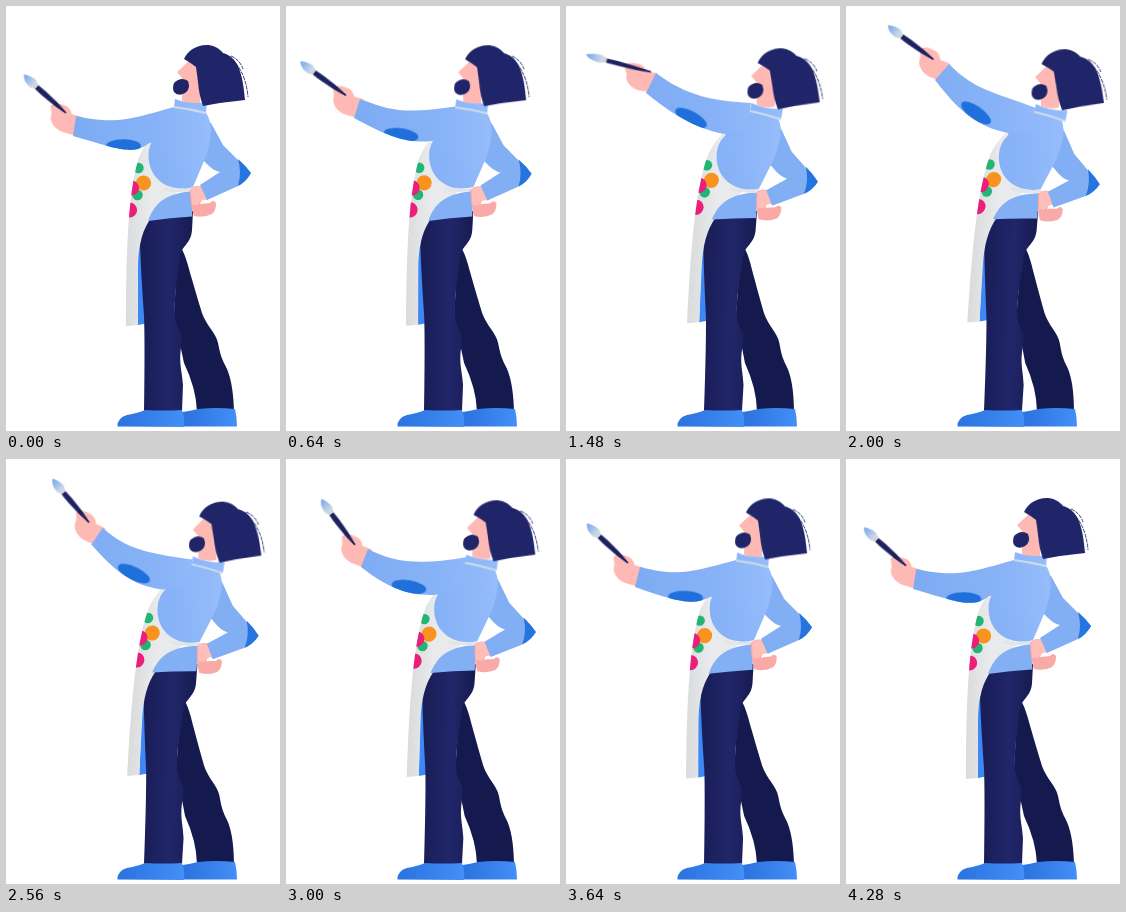
These frames come from a looping animation (274x425 px, 4320 ms). An HTML page without scripts:

```html
<!DOCTYPE html>
<html lang="en">
<head>
<meta charset="utf-8">
<title>Painter</title>
<style>
  @property --lean { syntax: "<number>"; inherits: true; initial-value: 0; }

  html, body { margin: 0; width: 100%; height: 100%; overflow: hidden; background: #fff; }
  svg { display: block; width: 100%; height: 100%; animation: lean 4320ms linear infinite; }

  /* Body parts follow one lean value */
  .torso { transform-origin: 165px 270px; transform: rotate(calc(var(--lean) * 5deg)); }
  .elbow { transform: translate(calc(var(--lean) * .5px), calc(var(--lean) * 4px)); }
  .fist { transform: translate(calc(var(--lean) * 1px), calc(var(--lean) * 2px)); }
  .head {
    transform-origin: 195px 75px;
    transform: translate(calc(var(--lean) * 18.5px), calc(var(--lean) * 4.5px)) rotate(calc(var(--lean) * -2deg));
  }
  .collar {
    transform-origin: 171px 97px;
    transform: translate(calc(var(--lean) * 1.5px), 0px) rotate(calc(var(--lean) * 8deg));
  }
  .legs { transform-origin: 160px 404px; transform: skewX(calc(var(--lean) * -1.5deg)); }
  .apron {
    transform-origin: 126px 319px;
    transform: translate(calc(var(--lean) * 1.5px), calc(var(--lean) * -3.5px)) skewX(calc(var(--lean) * -3.5deg));
  }

  .sleeve { animation: sleeve 4320ms linear infinite; }
  .patch { animation: patch 4320ms linear infinite; }
  .hand { animation: hand 4320ms linear infinite; }
  .brush { animation: brush 4320ms linear infinite; }

  @keyframes lean {
    0%, 100% { --lean: 0; }
    8% { --lean: .01; }
    14.81% { --lean: .06; }
    20% { --lean: .2; }
    25.9% { --lean: .42; }
    34.26% { --lean: .77; }
    39.8% { --lean: .91; }
    46.3% { --lean: .99; }
    52.8% { --lean: 1; }
    60% { --lean: .84; }
    69.44% { --lean: .54; }
    77.8% { --lean: .27; }
    84.26% { --lean: .11; }
    92% { --lean: .03; }
  }
  @keyframes sleeve {
    0%, 100% { d: path("M70 110C112 119 124 113 172 100L165 135L143 137C128 150 112 143 67 130Z"); }
    14.81% { d: path("M74 93C110 107 122 107 173 100L167 133L145 135C125 137 108 134 68 112Z"); }
    34.26% { d: path("M90 67C120 90 148 95 185 97L178 126L158 128C140 124 118 118 80 87Z"); }
    46.3% { d: path("M103 58C128 84 148 86 190 102L182 126L162 127C140 122 120 115 89 74Z"); }
    52.8% { d: path("M106 55C130 83 150 86 190 102L182 126L162 127C141 122 121 113 92 71Z"); }
    69.44% { d: path("M82 90C108 103 130 107 181 98L173 132L148 136C128 136 108 134 75 108Z"); }
    84.26% { d: path("M74 108C112 118 126 113 174 100L167 133L144 138C128 147 112 143 69 128Z"); }
  }
  @keyframes patch {
    0%, 100% { transform: translate(117.5px, 140px) rotate(0deg); }
    14.81% { transform: translate(115px, 129px) rotate(8deg); }
    34.26% { transform: translate(125px, 112px) rotate(28deg); }
    46.3% { transform: translate(130px, 107px) rotate(35deg); }
    52.8% { transform: translate(131px, 106px) rotate(36deg); }
    69.44% { transform: translate(123px, 128px) rotate(10deg); }
    84.26% { transform: translate(119.5px, 138.5px) rotate(2deg); }
  }
  @keyframes hand {
    0%, 100% { transform: translate(68.5px, 120px) rotate(0deg); }
    14.81% { transform: translate(71px, 102.5px) rotate(0deg); }
    34.26% { transform: translate(85px, 77px) rotate(-8deg); }
    46.3% { transform: translate(96px, 66px) rotate(6deg); }
    52.8% { transform: translate(99px, 63px) rotate(12deg); }
    69.44% { transform: translate(78.5px, 99px) rotate(4deg); }
    84.26% { transform: translate(71.5px, 118px) rotate(0deg); }
  }
  @keyframes brush {
    0%, 100% { transform: translate(60px, 107px) rotate(41.5deg) scale(1, 1); }
    14.81% { transform: translate(60px, 89.5px) rotate(36deg) scale(1, 1); }
    23.15% { transform: translate(69px, 78px) rotate(19deg) scale(1.07, .95); }
    34.26% { transform: translate(85px, 66px) rotate(14.5deg) scale(1.18, .85); }
    46.3% { transform: translate(87.5px, 53.5px) rotate(36deg) scale(1, 1); }
    52.8% { transform: translate(92px, 49px) rotate(47deg) scale(1, 1); }
    69.44% { transform: translate(69px, 86px) rotate(53deg) scale(1, 1); }
    84.26% { transform: translate(62px, 104px) rotate(43deg) scale(1, 1); }
  }
</style>
</head>
<body>
<svg viewBox="0 0 274 425" preserveAspectRatio="none">
  <defs>
    <linearGradient id="wool" gradientUnits="userSpaceOnUse" x1="70" y1="130" x2="205" y2="115">
      <stop offset="0" stop-color="#7dabf3"/>
      <stop offset=".6" stop-color="#87b2f7"/>
      <stop offset="1" stop-color="#96bdfb"/>
    </linearGradient>
    <linearGradient id="navy" gradientUnits="userSpaceOnUse" x1="136" y1="0" x2="187" y2="0">
      <stop offset="0" stop-color="#191e58"/>
      <stop offset=".55" stop-color="#21266a"/>
      <stop offset="1" stop-color="#161b50"/>
    </linearGradient>
    <linearGradient id="shoe">
      <stop offset="0" stop-color="#2b73df"/>
      <stop offset="1" stop-color="#438ef7"/>
    </linearGradient>
    <linearGradient id="cloth">
      <stop offset="0" stop-color="#d9dbdd"/>
      <stop offset=".45" stop-color="#e9eaeb"/>
    </linearGradient>
    <linearGradient id="bristle">
      <stop offset="0" stop-color="#6fa6ee"/>
      <stop offset="1" stop-color="#d5dde3"/>
    </linearGradient>
    <path id="bib" d="M120 320C120 295 120 240 124 200Q127 170 133 151Q139 137 151 126L153 140L166 178L171 186L156 202L143 215C135 228 132 242 132 264V319Z"/>
    <clipPath id="bibClip"><use href="#bib"/></clipPath>
    <clipPath id="armClip"><path class="sleeve" d="M70 110C112 119 124 113 172 100L165 135L143 137C128 150 112 143 67 130Z"/></clipPath>
  </defs>

  <path class="apron" fill="#3d88f5" d="M131 240H143V317L132 319Z"/>

  <g class="legs">
    <path fill="#141a4e" d="M172 238C179 245 182 260 185 270Q191 291 196 307C200 319 210 327 212 337C214 347 215 351 219 359Q227 373 228 405H191Q190 382 178 357L168 310Z"/>
    <path fill="url(#navy)" d="M139 207L187 205L186 224C185 238 176 239 174 250C171 275 168 291 169 309C169 322 177 324 176 335C172 358 176 362 177 379L176 405H138Q139 335 138 310Q135 268 134 238Z"/>
  </g>
  <path fill="url(#shoe)" d="M177 406Q184 405 192 403Q210 401 229 403Q231 411 231 420.5H177Z"/>
  <path fill="url(#shoe)" d="M111.5 420.5Q111 412 121 409Q132 407 139 404Q158 405 176 404Q179 411 178 421Z"/>

  <g class="apron">
    <use href="#bib" fill="url(#cloth)"/>
    <g clip-path="url(#bibClip)">
      <circle cx="132.5" cy="162" r="5.2" fill="#22b573"/>
      <circle cx="131.5" cy="189" r="5.2" fill="#22b573"/>
      <circle cx="137.5" cy="177" r="7.6" fill="#f7931e"/>
      <circle cx="125.5" cy="182" r="7.6" fill="#ec1e79"/>
      <circle cx="123.5" cy="204" r="7.6" fill="#ec1e79"/>
    </g>
  </g>

  <g class="torso">
    <path fill="#83aff5" d="M142 215C148 199 157 188 186 185V210.5Q164 212 142 215Z"/>
    <path fill="none" stroke="#e1e5e8" stroke-width="3" d="M158 183Q171 186 188 183"/>
    <g class="fist">
      <path fill="#f9aaa7" d="M184 184Q189 178 196 181L202 194Q196 191 194 198L204 197Q207 193 210 197Q210 205 206 208Q198 212 188 210Q184 199 184 184Z"/>
      <path fill="#ffbeb8" d="M185 184Q189 179 196 181L201 194Q194 193 192 199L186 199Z"/>
    </g>
    <g class="elbow">
      <path fill="#82aef4" d="M198 112L205 117L217 139L232 154Q240 160 245 167Q240 176 232 180L201 194L194 179L214 166Q207 165 198 155L192 150Z"/>
      <path fill="#2475df" d="M232 153Q240 160 245 167Q240 176 232 180Q236 167 232 153Z"/>
    </g>
    <path fill="url(#wool)" d="M150 107L170 101L199 105Q205 114 205 124Q204 142 198 155L187 181C165 187 143 175 142.5 150Q142 139 150 130Z"/>
  </g>

  <g class="hand">
    <path fill="#ffb9b4" d="M7 -9L-3 -12Q-4 -19 -11 -21Q-20 -25 -24 -20L-23 -12Q-25 -7 -22 -2Q-18 4 -12 6L5 11Z"/>
  </g>
  <g class="brush">
    <path fill="#1d2160" d="M0 .8Q-18 3.4 -39 2.5V-2.5Q-18 -3.2 0 -.8Z"/>
    <path fill="#cbd3d9" d="M-39 -2.7L-45 -4.3V4.3L-39 2.7Z"/>
    <path fill="url(#bristle)" d="M-43 -4.6Q-49 -5.5 -57 -1Q-54 4.5 -43 4.6Q-40 0 -43 -4.6Z"/>
  </g>
  <g class="hand">
    <path fill="#ffb9b4" d="M-23 -8Q-17 -12 -12 -9L-8 -3L-14 3Q-21 2 -23 -8Z"/>
  </g>

  <path class="sleeve" fill="url(#wool)" d="M70 110C112 119 124 113 172 100L165 135L143 137C128 150 112 143 67 130Z"/>
  <g clip-path="url(#armClip)">
    <ellipse class="patch" rx="17.5" ry="6.8" fill="#1f70da"/>
  </g>

  <g class="head">
    <path fill="#ffb9b4" d="M184 54L171 66L176 72L176 95Q184 99 194 97V58Z"/>
    <g class="collar">
      <path fill="url(#wool)" d="M169 93Q184 99 201 96L200 107Q184 105 168 101Z"/>
      <path fill="none" stroke="#cddbea" stroke-width="2" d="M168 101Q184 103 200 107"/>
    </g>
    <path fill="#20256a" d="M168 77Q175 70 182 75Q185 83 179 87Q172 91 168 86Q166 82 168 77Z"/>
    <path fill="#20256a" d="M178 53C184 39 206 33 217 47C233 51 237 70 239 94Q218 96 197 100Q193 89 192 76L190 61Q185 57 178 53Z"/>
    <path fill="none" stroke="#20256a" stroke-width=".9" stroke-dasharray="4 1" d="M218 48Q239 59 242 91M225 50Q234 54 237 63"/>
  </g>
</svg>
</body>
</html>
```
